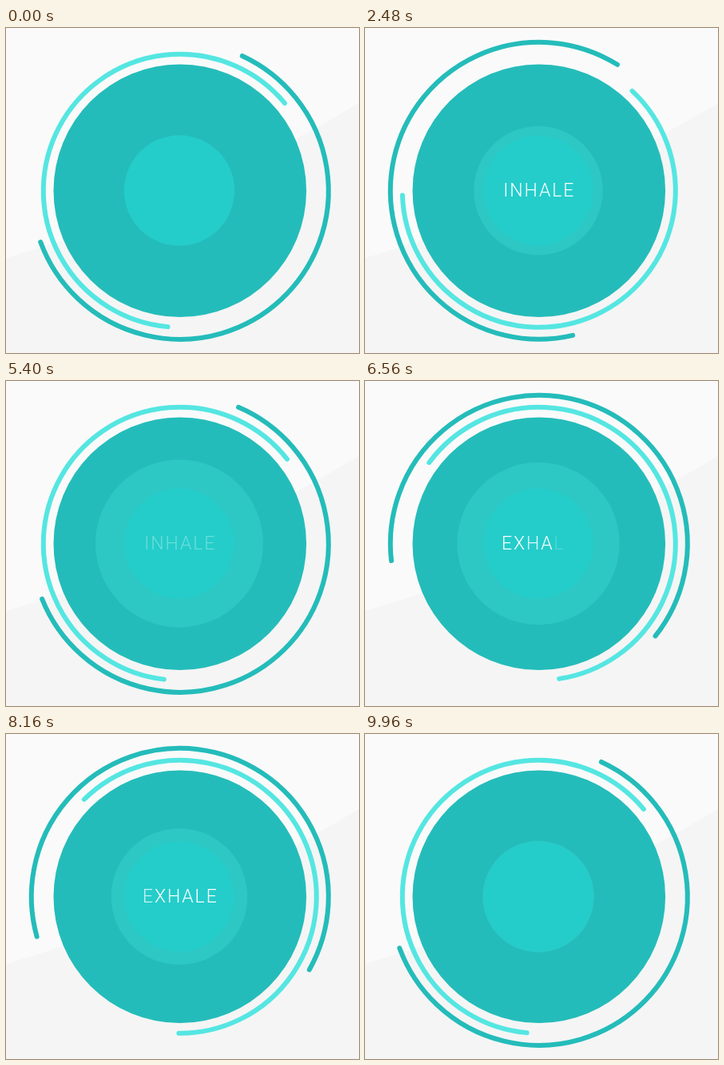
These frames come from a looping animation (442 px wide and 407 px high, 10000 ms). An HTML page:

```html
<!DOCTYPE html>
<html lang="en">
<head>
<meta charset="utf-8">
<title>Breathe</title>
<style>
  html, body { margin: 0; width: 100%; height: 100%; overflow: hidden; background: #fafafa; }
  svg { display: block; width: 442px; height: 407px; }
  .ring { fill: none; stroke-width: 6; stroke-linecap: round; }
  text { font: 300 23px Roboto, sans-serif; letter-spacing: 1.9px; text-anchor: middle; fill: #fff; }
</style>
</head>
<body>
<svg viewBox="0 0 442 407">
  <path d="M0 288Q229 221.6 442 94V407H0Z" fill="#f5f5f5"/>
  <g transform="translate(217.8 203.8)">
    <path id="outer" class="ring" stroke="#24bcba"/>
    <path id="inner" class="ring" stroke="#55e6e2"/>
    <circle r="158.3" fill="#24bcba"/>
    <circle id="halo" cx="-.8" cy="-.2" fill="#2dc7c4"/>
    <circle r="69" cx="-.8" cy="-.2" fill="#24cdca"/>
    <text id="inhale" x=".5" y="7.6"></text>
    <text id="exhale" x=".5" y="7.6"></text>
  </g>
</svg>
<script>
const LOOP = 10000, STEP = 40, HOLD = 400;
const $ = id => document.getElementById(id);
const clamp = x => Math.min(1, Math.max(0, x));
const ramp = (t, start, length) => clamp((t - start) / length);
const cubic = x => x < .5 ? 4 * x ** 3 : 1 - 4 * (1 - x) ** 3;
const sine = x => (1 - Math.cos(Math.PI * x)) / 2;

// Arc of 225 degrees, starting on the positive x axis
function arc(r) {
  const a = 225 * Math.PI / 180;
  return `M${r} 0A${r} ${r} 0 1 1 ${r * Math.cos(a)} ${r * Math.sin(a)}`;
}
$('outer').setAttribute('d', arc(186));
$('inner').setAttribute('d', arc(171));

function letters(id) {
  return [...id.toUpperCase()].map(c => {
    const span = document.createElementNS('http://www.w3.org/2000/svg', 'tspan');
    span.textContent = c;
    $(id).append(span);
    return span;
  });
}
const inhale = letters('inhale'), exhale = letters('exhale');
const order = [0, 1, 3, 2, 4, 5];
const stagger = (t, start, i) => ramp(t, start + order[i] * 200, 300);

function draw(t) {
  const rest = t < HOLD;
  const turn = rest ? 0 : 1080 * (cubic(ramp(t, 40, 5000)) - cubic(ramp(t, 5040, 5000)));
  $('outer').setAttribute('transform', `rotate(${turn - 65.2})`);
  $('inner').setAttribute('transform', `rotate(${95.1 - turn})`);

  const grow = rest ? 0 : sine(ramp(t, 620, 4800)) - sine(ramp(t, 5620, 4800));
  $('halo').setAttribute('r', 69 + 36 * grow);

  inhale.forEach((s, i) =>
    s.setAttribute('fill-opacity', stagger(t, 600, i) * (1 - ramp(t, 5100, 450))));
  exhale.forEach((s, i) =>
    s.setAttribute('fill-opacity', stagger(t, 5700, i) * (1 - stagger(t, 8085, i))));
}

function tick() {
  draw(Math.floor(performance.now() % LOOP / STEP) * STEP);
  requestAnimationFrame(tick);
}
tick();
</script>
</body>
</html>
```
